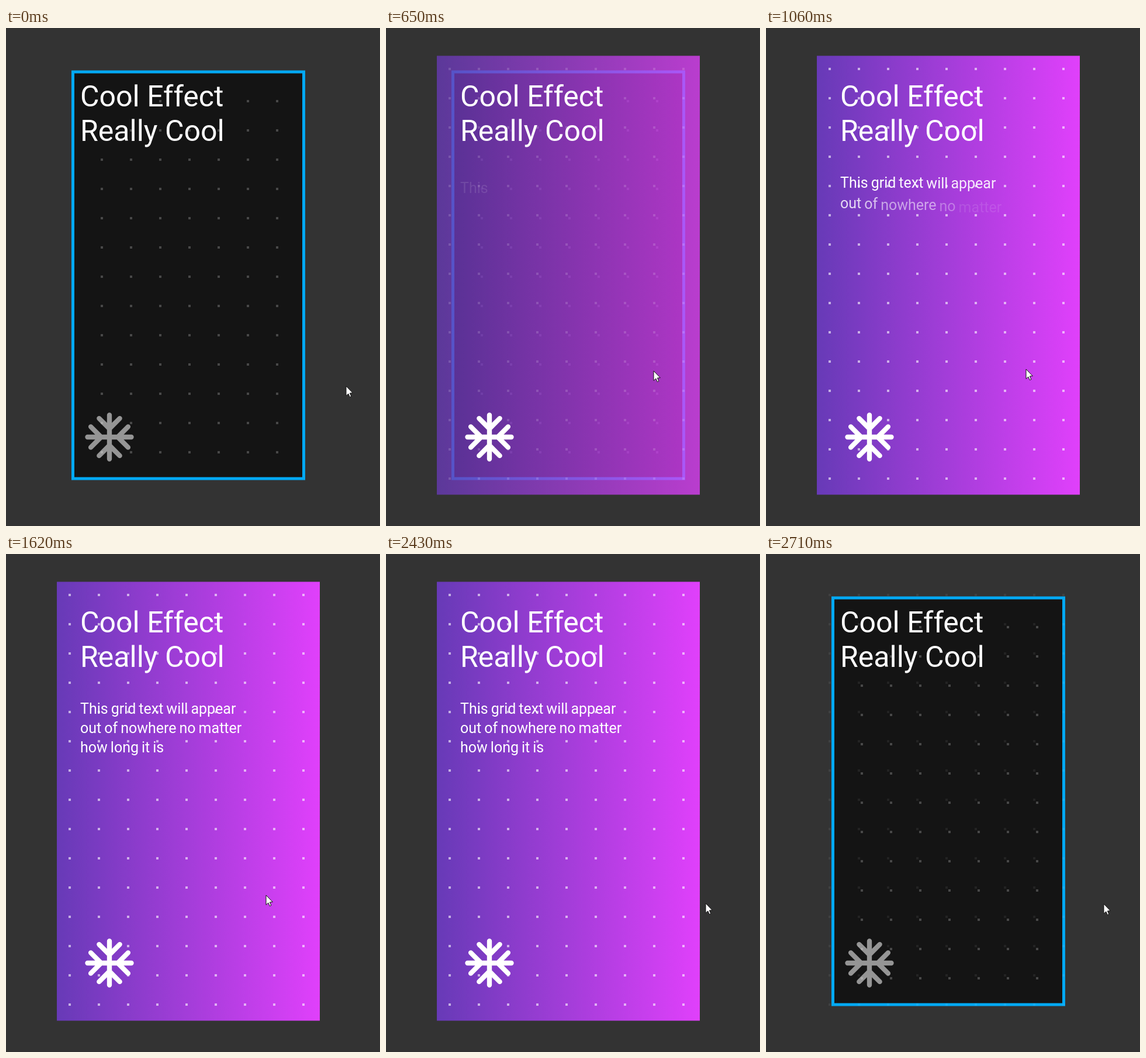
Animation of 640 by 851 pixels, one loop 3260 ms. Source, as an HTML page with a canvas:

```html
<!DOCTYPE html>
<html lang="en">
<head>
<meta charset="utf-8">
<title>Card hover effect</title>
<style>
  html, body { margin: 0; width: 100%; height: 100%; overflow: hidden; background: #333; }
  canvas { display: block; }
</style>
</head>
<body>
<canvas id="stage" width="640" height="851"></canvas>
<script>
const ctx = document.getElementById('stage').getContext('2d');

const LOOP = 3260;
const FIRST_MOVE = 380;
const STEP = 69;
const HOVER_IN = 580;
const HOVER_OUT = 2398;
const GLOW_FADE = 160;
const DOT_FADE = 420;
const WORDS_START = 605;
const WORD_DELAY = 46;
const WORD_FADE = 460;

const CARD = { x: 112, y: 72.5, w: 400, h: 700, border: 5 };
const GLOW = { x: 87, y: 47.5, w: 450, h: 750 };
const TEXT_X = 127;
const LINES = ['This grid text will appear', 'out of nowhere no matter', 'how long it is'];

// Pointer tip: time, x, y
const POINTER_PATH = [
  [311, 582, 612], [380, 575, 611], [449, 555, 607], [518, 520, 598],
  [587, 480, 590], [656, 458, 586], [725, 445, 583], [2036, 445, 583],
  [2105, 449, 584], [2174, 463, 587], [2243, 488, 591], [2312, 518, 595],
  [2381, 547, 597], [2450, 571, 598], [2519, 577, 598], [2588, 578, 598]
];
const ARROW = [[0, 0], [0, 16.5], [3.8, 13], [6.3, 18.6], [8.8, 17.5], [6.4, 12], [11.3, 11.7]];

const clamp = v => Math.min(1, Math.max(0, v));

// CSS "ease": cubic-bezier(.25, .1, .25, 1)
function ease(progress) {
  const x = clamp(progress);
  const bezier = (u, a, b) => 3 * u * (1 - u) ** 2 * a + 3 * u * u * (1 - u) * b + u ** 3;
  let low = 0, high = 1;
  for (let i = 0; i < 20; i++) {
    const mid = (low + high) / 2;
    if (bezier(mid, 0.25, 0.25) < x) low = mid; else high = mid;
  }
  return bezier(low, 0.1, 1);
}

function hoverFade(t, duration) {
  return t < HOVER_OUT
    ? ease((t - HOVER_IN) / duration)
    : 1 - ease((t - HOVER_OUT) / duration);
}

function withAlpha(alpha, draw) {
  ctx.save();
  ctx.globalAlpha = alpha;
  draw();
  ctx.restore();
}

function drawDots(x, y, columns, rows) {
  ctx.fillStyle = '#fff';
  for (let row = 0; row < rows; row++) {
    for (let col = 0; col < columns; col++) {
      ctx.fillRect(x + col * 50 - 2, y + row * 50 - 2, 4, 4);
    }
  }
}

function drawCard() {
  const { x, y, w, h, border } = CARD;
  ctx.fillStyle = '#03a9f4';
  ctx.fillRect(x, y, w, h);
  ctx.fillStyle = '#141414';
  ctx.fillRect(x + border, y + border, w - 2 * border, h - 2 * border);
  withAlpha(0.22, () => drawDots(164, 125, 7, 13));
}

function drawGlow() {
  const fill = ctx.createLinearGradient(GLOW.x, 0, GLOW.x + GLOW.w, 0);
  fill.addColorStop(0, '#673ab7');
  fill.addColorStop(1, '#e040fb');
  ctx.fillStyle = fill;
  ctx.fillRect(GLOW.x, GLOW.y, GLOW.w, GLOW.h);
}

function drawSnowflake() {
  const flake = new Path2D();
  for (let i = 0; i < 4; i++) {
    const angle = i * Math.PI / 2;
    const point = (x, y) => [
      x * Math.cos(angle) - y * Math.sin(angle),
      x * Math.sin(angle) + y * Math.cos(angle)
    ];
    flake.moveTo(0, 0);
    flake.lineTo(...point(0, -9));
    flake.moveTo(...point(-4.24, -7.66));
    flake.lineTo(...point(0, -3.42));
    flake.lineTo(...point(4.24, -7.66));
  }
  ctx.translate(177, 699);
  ctx.scale(100 / 24, 100 / 24);
  ctx.lineWidth = 2;
  ctx.lineCap = 'round';
  ctx.strokeStyle = '#fff';
  ctx.stroke(flake);
}

function drawTitle() {
  ctx.fillStyle = '#fff';
  ctx.font = '50px Roboto, sans-serif';
  ctx.fillText('Cool Effect', TEXT_X, 134);
  ctx.fillText('Really Cool', TEXT_X, 193);
}

function drawWords(t) {
  ctx.font = '25px Roboto, sans-serif';
  let index = 0;
  LINES.forEach((line, row) => {
    let x = TEXT_X;
    for (const word of line.split(' ')) {
      const shown = ease((t - WORDS_START - index++ * WORD_DELAY) / WORD_FADE);
      const y = 273 + row * 33 + 10 * (1 - shown);
      const left = x;
      withAlpha(shown, () => ctx.fillText(word, left, y));
      x += ctx.measureText(word).width + 5;
    }
  });
}

function pointerAt(t) {
  const next = POINTER_PATH.findIndex(key => key[0] > t);
  if (next === 0) return POINTER_PATH[0].slice(1);
  if (next < 0) return POINTER_PATH[POINTER_PATH.length - 1].slice(1);
  const [t0, x0, y0] = POINTER_PATH[next - 1];
  const [t1, x1, y1] = POINTER_PATH[next];
  const k = (t - t0) / (t1 - t0);
  return [x0 + (x1 - x0) * k, y0 + (y1 - y0) * k];
}

function drawPointer(t) {
  ctx.save();
  ctx.translate(...pointerAt(t));
  ctx.beginPath();
  ARROW.forEach(point => ctx.lineTo(...point));
  ctx.closePath();
  ctx.fillStyle = '#fff';
  ctx.fill();
  ctx.lineWidth = 1;
  ctx.strokeStyle = '#111';
  ctx.stroke();
  ctx.restore();
}

function draw(t) {
  const hovered = t >= HOVER_IN && t < HOVER_OUT;
  ctx.fillStyle = '#333';
  ctx.fillRect(0, 0, 640, 851);
  drawCard();
  withAlpha(hoverFade(t, GLOW_FADE), drawGlow);
  withAlpha(0.6 * hoverFade(t, DOT_FADE), () => drawDots(109, 70, 9, 15));
  withAlpha(hovered ? 1 : 0.55, drawSnowflake);
  drawTitle();
  if (hovered) drawWords(t);
  drawPointer(t);
}

const snap = t => FIRST_MOVE + Math.floor((t - FIRST_MOVE + 13) / STEP) * STEP;

const start = performance.now();
function tick() {
  draw(snap((performance.now() - start) % LOOP));
  requestAnimationFrame(tick);
}
tick();
</script>
</body>
</html>
```
